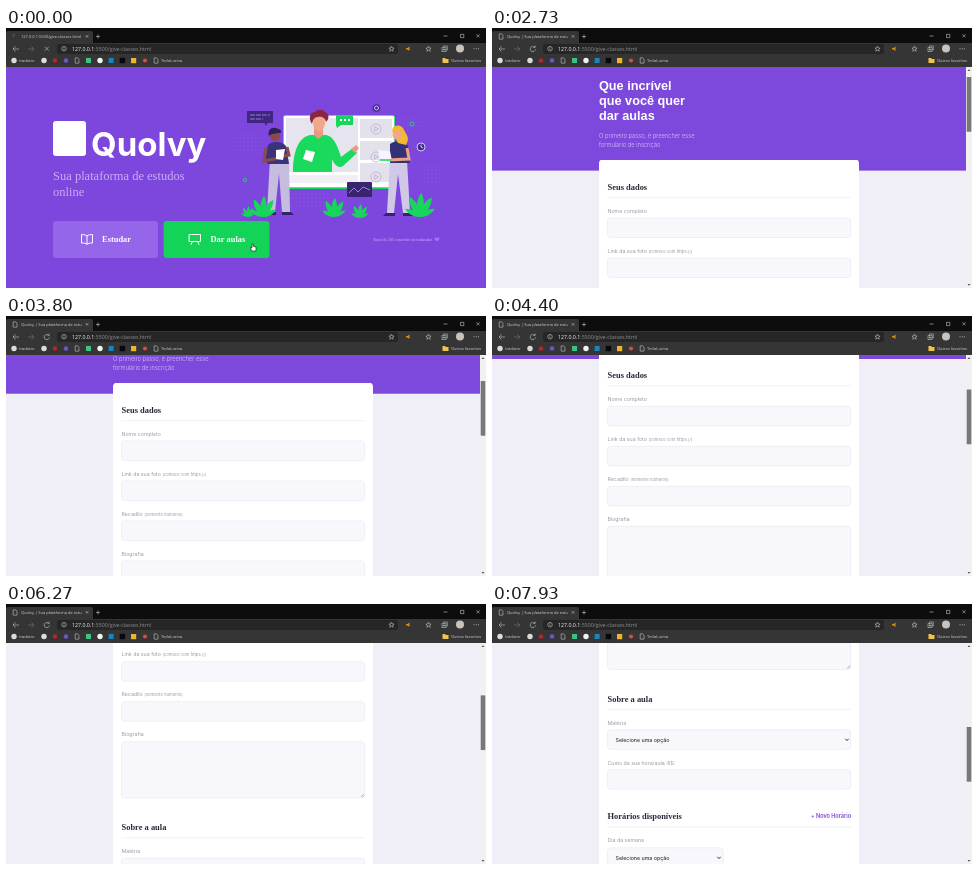
Recreate the animation shown at these times as an HTML page. Size 480 by 260 pixels, loop 8000 ms.

```html
<!DOCTYPE html>
<html lang="pt-BR">
<head>
<meta charset="utf-8">
<title>Quolvy</title>
<style>
@property --scroll { syntax: '<number>'; inherits: true; initial-value: 0; }
html, body { margin: 0; width: 100%; height: 100%; overflow: hidden; background: #f0eff8; }
svg.stage {
  display: block; width: 100vw; height: 100vh;
  font-family: Inter, sans-serif;
  animation: scroll 8s linear infinite;
}

.page { transform: translateY(calc(var(--scroll) * -1px)); }
.thumb { transform: translateY(calc(var(--scroll) * .246px)); animation: grab 8s step-end infinite; }
.rise { animation: rise 8s infinite; }
.before { animation: before 8s step-end infinite; }
.after { animation: after 8s step-end infinite; }
.beam { animation: beam 8s step-end infinite; }
.arrow { animation: arrow 8s step-end infinite, move 8s ease-in-out infinite; }

@keyframes scroll {
  0%, 30.875% { --scroll: 0; }
  41.625% { --scroll: 54; }
  55% { --scroll: 116; }
  57.5%, 64.125% { --scroll: 117; }
  66.625% { --scroll: 128; }
  68.375% { --scroll: 131; }
  70% { --scroll: 141; }
  85.875% { --scroll: 231; }
  99.125%, 100% { --scroll: 317; }
}
@keyframes grab { 0% { fill: #c1c1c1; } 30.875%, 100% { fill: #787878; } }
@keyframes rise {
  0%, .875% { opacity: 0; transform: translateY(16px); animation-timing-function: ease-out; }
  5.875%, 100% { opacity: 1; transform: none; }
}
@keyframes before { 0% { visibility: visible; } .875%, 100% { visibility: hidden; } }
@keyframes after { 0% { visibility: hidden; } .875%, 100% { visibility: visible; } }
@keyframes beam { 0% { visibility: hidden; } .875% { visibility: visible; } 14.125%, 100% { visibility: hidden; } }
@keyframes arrow { 0% { visibility: hidden; } 14.125% { visibility: visible; } 30.875%, 100% { visibility: hidden; } }
@keyframes move {
  0%, 14.125% { transform: translate(247px, 214px); }
  17.5% { transform: translate(147px, 186px); }
  20.625% { transform: translate(475px, 60px); }
  24.125%, 25.875% { transform: translate(187px, 147px); }
  28.375%, 100% { transform: translate(476px, 88px); }
}

.ui { font: 4px "Open Sans", sans-serif; fill: #d2d2d2; }
.url { font-size: 5.27px; fill: #8f8f8f; }
.line { fill: none; stroke: #c8c8c8; stroke-width: .6; }
.dim { stroke: #777; }
.title { font: bold 12.7px "Liberation Sans", sans-serif; fill: #fff; }
.intro { font-size: 5.75px; font-weight: 300; fill: #d9c9fb; }
.legend { font: bold 8.45px "Liberation Serif", serif; fill: #2b2639; }
.label { font-size: 5.25px; fill: #9c98a6; }
.label tspan { font-size: 4.2px; }
.option { font-size: 5.3px; fill: #161616; }
.field { fill: #f8f8fc; stroke: #e0e0ec; stroke-width: .5; rx: 3px; }
.rule { stroke: #e0e0ec; stroke-width: .45; }
.chevron { fill: none; stroke: #222; stroke-width: .9; }
.button { font: bold 8.45px "Liberation Serif", serif; fill: #fff; }
.icon { fill: none; stroke: #fff; stroke-width: 1; stroke-linejoin: round; stroke-linecap: round; }
</style>
</head>
<body>
<svg class="stage" viewBox="0 0 480 260" preserveAspectRatio="none">
  <defs>
    <pattern id="dots" width="4" height="4" patternUnits="userSpaceOnUse">
      <circle cx="2" cy="2" r=".4" fill="#9a72ea"/>
    </pattern>
    <path id="leaf" d="M0 0C-4-6-5-14-1-20C3-14 3-6 0 0"/>
    <g id="plant" fill="#17d65b">
      <use href="#leaf" transform="rotate(6)"/>
      <use href="#leaf" transform="rotate(-24) scale(.95)"/>
      <use href="#leaf" transform="rotate(34) scale(.95)"/>
      <use href="#leaf" transform="rotate(-58) scale(.7)"/>
      <use href="#leaf" transform="rotate(64) scale(.7)"/>
    </g>
    <g id="play" fill="none" stroke="#b9b1d3" stroke-width=".8">
      <circle r="5"/><path d="M-1.4-2.3L2.4 0L-1.4 2.3Z"/>
    </g>
    <path id="sheet" class="line" d="M-1.8-2.6H.7L2-1.3V2.6H-1.8Z"/>
    <path id="pointer" d="M0 0V8L2 6.3L3.4 9.2L4.6 8.6L3.3 5.8H5.8Z" fill="#fff" stroke="#111" stroke-width=".6"/>
  </defs>

  <!-- Form page -->
  <rect y="39" width="480" height="221" fill="#f0eff8"/>
  <g class="page">
    <rect width="474" height="159" fill="#7d48dc"/>
    <g class="rise">
      <path d="M41 50H24.5M27.5 47.5L24.5 50L27.5 52.5" fill="none" stroke="#cdb8f7" stroke-width=".7"/>
      <text x="431" y="52.5" font-size="5.8" font-weight="700" fill="#fff">Quolvy</text>
      <text class="title">
        <tspan x="107" y="78">Que incrível</tspan>
        <tspan x="107" y="93">que você quer</tspan>
        <tspan x="107" y="108">dar aulas</tspan>
      </text>
      <text class="intro">
        <tspan x="107" y="126">O primeiro passo, é preencher esse</tspan>
        <tspan x="107" y="135">formulário de inscrição</tspan>
      </text>
    </g>
    <g class="rise">
      <rect x="107" y="148" width="260" height="520" rx="4" fill="#fff"/>

      <text class="legend" x="115.5" y="178.3">Seus dados</text>
      <path class="rule" d="M115.5 186H359"/>
      <text class="label" x="115.5" y="201">Nome completo</text>
      <rect class="field" x="115.6" y="206.3" width="243" height="19.6"/>
      <text class="label" x="115.5" y="241">Link da sua foto <tspan>(comece com https://)</tspan></text>
      <rect class="field" x="115.6" y="246.3" width="243" height="19.6"/>
      <text class="label" x="115.5" y="281">Recadilo <tspan>(somente números)</tspan></text>
      <rect class="field" x="115.6" y="286.3" width="243" height="19.6"/>
      <text class="label" x="115.5" y="321">Biografia</text>
      <rect class="field" x="115.6" y="326.3" width="243" height="56.2"/>
      <path d="M355 381.5L358 378.5M356.8 381.5L358 380.3" stroke="#777" stroke-width=".5"/>

      <text class="legend" x="115.5" y="415">Sobre a aula</text>
      <path class="rule" d="M115.5 422.3H359"/>
      <text class="label" x="115.5" y="437.5">Matéria</text>
      <rect class="field" x="115.6" y="442.8" width="243" height="19.6"/>
      <text class="option" x="123.5" y="454.6">Selecione uma opção</text>
      <path class="chevron" d="M353.3 451.8L355 453.6L356.7 451.8"/>
      <text class="label" x="115.5" y="477.5">Custo da sua hora/aula <tspan>(R$)</tspan></text>
      <rect class="field" x="115.6" y="482.6" width="243" height="19.6"/>

      <text class="legend" x="115.5" y="532.2">Horários disponíveis</text>
      <text x="359" y="531" text-anchor="end" font-size="5.5" font-weight="600" fill="#7d48dc">+ Novo Horário</text>
      <path class="rule" d="M115.5 540H359"/>
      <text class="label" x="115.5" y="555">Dia da semana</text>
      <rect class="field" x="115.6" y="560.8" width="115.5" height="19.6"/>
      <text class="option" x="123.5" y="572.6">Selecione uma opção</text>
      <path class="chevron" d="M225.3 569.8L227 571.6L228.7 569.8"/>
    </g>
  </g>
  <rect x="474" y="39" width="6" height="221" fill="#f1f1f1"/>
  <path d="M475.5 43L477 41.3L478.5 43ZM475.5 256L477 257.7L478.5 256Z" fill="#555"/>
  <rect class="thumb" x="474.7" y="45" width="4.6" height="54.7"/>

  <!-- Landing page -->
  <g class="before">
    <rect y="39" width="480" height="221" fill="#7d46dd"/>
    <rect x="47" y="93" width="33" height="35" rx="3" fill="#fff"/>
    <text x="85" y="128" font-size="33" font-weight="700" fill="#fff">Quolvy</text>
    <text font-family="Liberation Serif, serif" font-size="12.5" fill="#c9aff5">
      <tspan x="47" y="152">Sua plataforma de estudos</tspan>
      <tspan x="47" y="168">online</tspan>
    </text>
    <rect x="47" y="193" width="105" height="37" rx="3" fill="#9565ea"/>
    <rect x="157.6" y="193" width="105.8" height="37" rx="3" fill="#13d457"/>
    <path class="icon" d="M81 208C80 206.8 78 206.6 75.5 206.6V215C78 215 80 215.2 81 216.4C82 215.2 84 215 86.5 215V206.6C84 206.6 82 206.8 81 208V216"/>
    <path class="icon" d="M183.5 206.5H194.5V213.5H183.5ZM186.5 213.5L185 216.5M191.5 213.5L193 216.5"/>
    <text class="button" x="96" y="214">Estudar</text>
    <text class="button" x="204.5" y="214">Dar aulas</text>
    <text x="367" y="213.3" font-family="Liberation Serif, serif" font-size="4.2" fill="#cdb6f5">Total de 285 conexões já realizadas</text>
    <path d="M431 213.6L428.8 211.4C428 209.8 430 208.8 431 210.3C432 208.8 434 209.8 433.2 211.4Z" fill="#a678ee"/>

    <g>
      <rect x="228" y="104" width="28" height="24" fill="url(#dots)"/>
      <rect x="392" y="88" width="24" height="16" fill="url(#dots)"/>
      <rect x="418" y="136" width="18" height="24" fill="url(#dots)"/>
      <rect x="284" y="164" width="40" height="20" fill="url(#dots)"/>
      <rect x="277" y="87" width="112" height="74" rx="2" fill="#18d65c"/>
      <rect x="277.8" y="87.8" width="110.4" height="71.4" rx="1.5" fill="#fff"/>
      <rect x="280" y="90" width="72" height="54" fill="#e6e4ee"/>
      <rect x="280" y="147" width="72" height="8" fill="#f1eff6"/>
      <g fill="#e3e1ec">
        <rect x="354" y="91" width="32" height="19"/>
        <rect x="354" y="113" width="32" height="19"/>
        <rect x="354" y="135" width="32" height="19"/>
      </g>
      <use href="#play" x="370" y="101"/>
      <use href="#play" x="370" y="129"/>
      <use href="#play" x="370" y="149"/>

      <!-- Teacher on screen -->
      <path d="M287 144C287 121 294 108 305 107H320C327 108 331 116 335 129L347 120L351 125L337 138C332 141 328 136 326 131V144Z" fill="#19da5d"/>
      <path d="M308 98H317V107L312.5 111L308 107ZM345 121L350 117L353 120L349 125Z" fill="#e89b83"/>
      <ellipse cx="313" cy="95" rx="6" ry="8" fill="#f0a78c"/>
      <path d="M306 96C302 90 304 84 309 84C311 81 317 81 319 84C324 86 323 91 320 94C319 89 315 88 312 89C308 89 307 92 306 96Z" fill="#8c263f"/>
      <path d="M300 122L309 124L306 134L297 131Z" fill="#fff"/>

      <!-- Students -->
      <g>
        <path d="M264 131H283L284 184H276L273 146L269 184H261Z" fill="#c5bcdf"/>
        <path d="M262 117C266 113 276 113 280 118L283 136H262L259 132Z" fill="#393379"/>
        <path d="M260 120L258 133L273 130M281 119L283 127L274 129" fill="none" stroke="#8b4a48" stroke-width="3"/>
        <circle cx="269" cy="108" r="5" fill="#8b4a48"/>
        <path d="M263 108C261 101 267 98 272 101C276 101 276 106 273 105L266 106Z" fill="#2c2058"/>
        <path d="M270 122L279 121L277 132L270 131Z" fill="#fff"/>
        <path d="M260 184H270V187H258ZM276 184H285L288 187H276Z" fill="#30256b"/>
      </g>
      <g>
        <path d="M384 132H401L404 185H397L392 146L388 185H381Z" fill="#d0c8e6"/>
        <path d="M384 116C389 112 398 113 402 118L404 135H384Z" fill="#343176"/>
        <path d="M401 120L403 131L381 132" fill="none" stroke="#eea283" stroke-width="3"/>
        <path d="M387 106C383 96 396 95 398 102C401 108 404 109 400 117L392 115Z" fill="#f1b934"/>
        <circle cx="391" cy="107" r="4.6" fill="#f0a78c"/>
        <path d="M372 122L384 123L386 133H374Z" fill="#f6f3ff"/>
        <path d="M374 132H386" stroke="#18d65c" stroke-width="1.5"/>
        <path d="M380 185H389V188H377ZM397 185H405L408 188H397Z" fill="#30256b"/>
      </g>

      <!-- Floating details -->
      <path d="M241 83H267V95H262L259 98V95H241Z" fill="#402681"/>
      <path d="M244 87H264M244 91H257" stroke="#9d83d9" stroke-width=".9" stroke-dasharray="5 1"/>
      <path d="M330 87H347V97H335L331 100L330 97Z" fill="#18d65c"/>
      <path d="M334 92H344" stroke="#fff" stroke-width="2" stroke-dasharray="2"/>
      <g fill="#42278a" stroke="#d7c8f6" stroke-width="1">
        <circle cx="370.5" cy="80" r="3.3" stroke="#42278a" stroke-width="1.5" stroke-dasharray="1.5 1"/>
        <circle cx="370.5" cy="80" r="2"/>
        <circle cx="415" cy="119" r="4"/>
        <path d="M415 116.5V119L417 120" fill="none"/>
      </g>
      <rect x="341" y="154" width="25" height="15" rx="1" fill="#3a236f"/>
      <path d="M343 165L348 160L352 164L357 159L364 162" fill="none" stroke="#aa8cec" stroke-width=".9"/>
      <circle cx="239" cy="152" r="1.6" fill="none" stroke="#18d65c"/>
      <circle cx="406" cy="96" r="2" fill="none" stroke="#18d65c"/>
      <use href="#plant" transform="translate(242 189) scale(.55)"/>
      <use href="#plant" transform="translate(257 189) scale(1.05)"/>
      <use href="#plant" transform="translate(328 189) scale(.95)"/>
      <use href="#plant" transform="translate(354 190) scale(.7)"/>
      <use href="#plant" transform="translate(414 189) scale(1.2)"/>
    </g>
  </g>

  <!-- Browser -->
  <rect width="480" height="39" fill="#353535"/>
  <rect width="480" height="15" fill="#0d0d0d"/>
  <path d="M0 15V5Q0 3 2 3H85Q87 3 87 5V15Z" fill="#353535"/>
  <g class="ui">
    <g class="after">
      <use href="#sheet" x="9" y="8.5"/>
      <svg x="15" y="3" width="61" height="11"><text y="7">Quolvy | Sua plataforma de estudos</text></svg>
      <path class="line" d="M42.6 19.2A2.6 2.6 0 1 0 43.4 21.3M43.2 17.6V19.4H41.4"/>
    </g>
    <g class="before">
      <path d="M9 6.4A2.2 2.2 0 0 0 7 9.4" fill="none" stroke="#5e8ab8" stroke-width=".6"/>
      <text x="15" y="10">127.0.0.1:5500/give-classes.html</text>
      <path class="line" d="M38.8 18.7L42.8 22.7M42.8 18.7L38.8 22.7"/>
    </g>
    <path class="line" d="M79.8 7.2L82.2 9.6M82.2 7.2L79.8 9.6M90 8.5H94M92 6.5V10.5M437.5 8H441.5M454.5 6.3H457.8V9.6H454.5ZM470.4 6.2L473.6 9.4M473.6 6.2L470.4 9.4"/>
    <path class="line" d="M13 21H7.2M9.6 18.4L7 21L9.6 23.6"/>
    <path class="line dim" d="M22 21H27.8M25.4 18.4L28 21L25.4 23.6"/>
    <rect x="51" y="16" width="341" height="10" rx="2" fill="#262626"/>
    <circle class="line" cx="58" cy="20.7" r="2.3"/>
    <path class="line" d="M58 20.3V22M58 19V19.6"/>
    <text class="url" x="66" y="22.7"><tspan fill="#f4f4f4">127.0.0.1</tspan>:5500/give-classes.html</text>
    <path id="star" class="line" d="M385.5 18.2L386.3 20L388.1 20.1L386.7 21.3L387.2 23.2L385.5 22.2L383.8 23.2L384.3 21.3L382.9 20.1L384.7 20Z"/>
    <use href="#star" x="37"/>
    <path d="M400 20H401.5L403.5 18.5V23.1L401.5 21.6H400Z" fill="#d98a1c"/>
    <path class="line" d="M436 19.5H440V23.5H436ZM437.5 19V18H441.3V22H440M438 20.3V22.7M436.8 21.5H439.2"/>
    <circle cx="454" cy="20.5" r="4" fill="#c9c3bd"/>
    <g><circle cx="468" cy="20.7" r=".5"/><circle cx="470.2" cy="20.7" r=".5"/><circle cx="472.4" cy="20.7" r=".5"/></g>

    <circle cx="8" cy="32.5" r="2.7" fill="#dcdcdc"/>
    <text x="13" y="34">tradutor</text>
    <circle cx="38" cy="32.5" r="2.7" fill="#dcdcdc"/>
    <circle cx="49" cy="32.5" r="2.2" fill="#c02222"/>
    <circle cx="60" cy="32.5" r="2.3" fill="#6757c8"/>
    <use href="#sheet" x="71" y="32.5"/>
    <rect x="80" y="30" width="5" height="5" fill="#3fc085"/>
    <circle cx="94" cy="32.5" r="2.7" fill="#f2f2f2"/>
    <rect x="102.6" y="30" width="5" height="5" fill="#1686bd"/>
    <rect x="113.7" y="29.8" width="5.4" height="5.4" fill="#080808"/>
    <rect x="125" y="30" width="5.2" height="5.2" fill="#f3b42c"/>
    <circle cx="139" cy="32.5" r="2.1" fill="#d9493c"/>
    <use href="#sheet" x="150" y="32.5"/>
    <text x="155" y="34">TeclaLurina</text>
    <path d="M436.5 30H439L440 31H442.5V35H436.5Z" fill="#efc34c"/>
    <text x="445" y="34">Outros favoritos</text>
  </g>

  <!-- Pointers -->
  <path class="before" d="M245.5 223L244.5 219.5L246 219.8V215.8H247.2V218.2L250 219V223Z" fill="#fff" stroke="#111" stroke-width=".6"/>
  <path class="beam" d="M245.5 212.8H248.3M245.5 219H248.3M246.9 212.8V219" fill="none" stroke="#222" stroke-width=".8"/>
  <g class="arrow"><use href="#pointer"/></g>
</svg>
</body>
</html>
```
